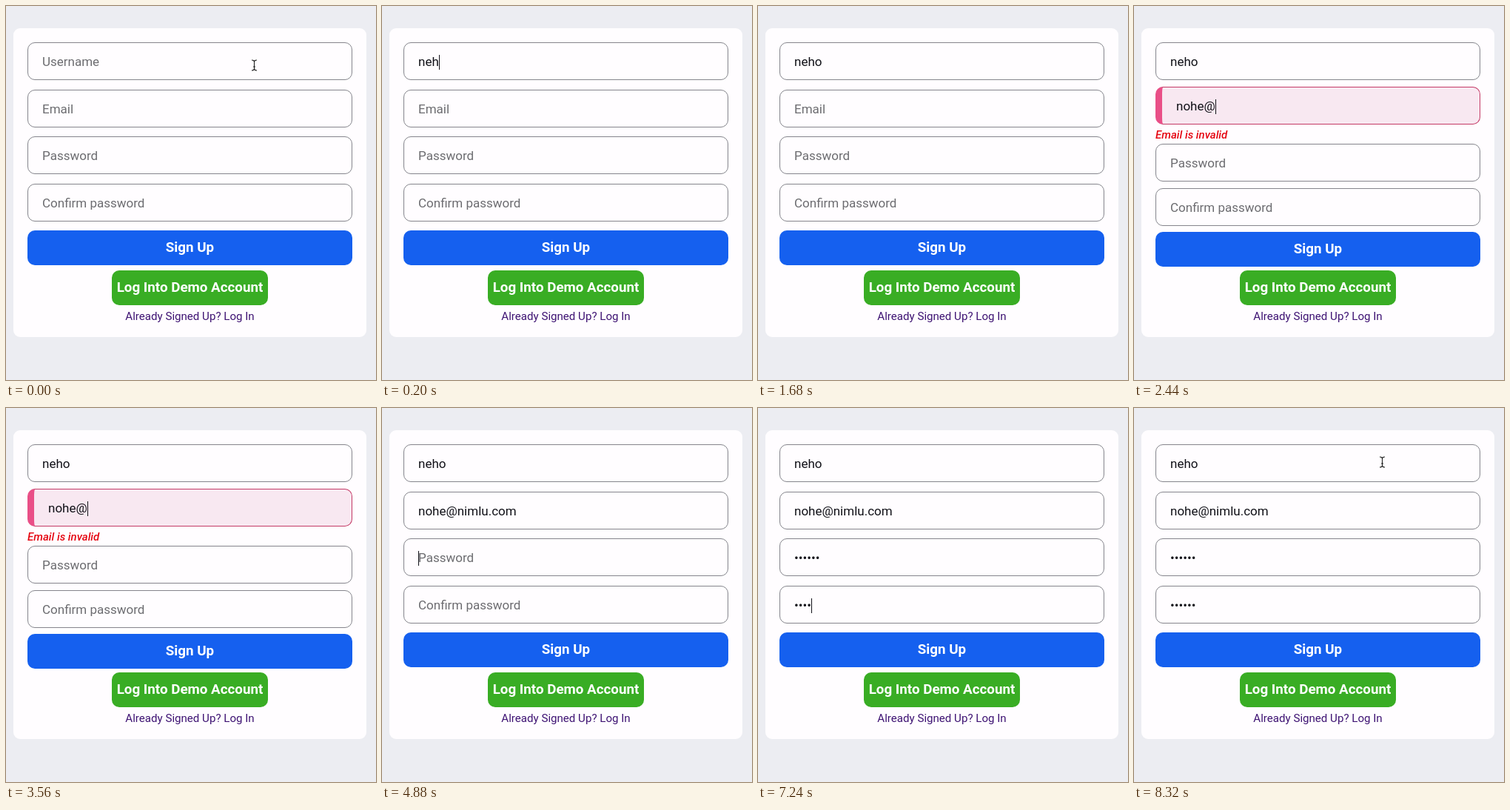
Write an HTML page that moves like this. It is 500 px wide and 505 px high and loops after 8360 ms.

```html
<!DOCTYPE html>
<html lang="en">
<head>
<meta charset="utf-8">
<title>Sign up form</title>
<style>
html, body { margin: 0; width: 100%; height: 100%; overflow: hidden; background: #ecedf2; }
body { position: relative; font-family: Roboto, Arial, sans-serif; }
body * { box-sizing: border-box; }
.card, .field, .button, .error, .link, .mouse { position: absolute; white-space: nowrap; }
.card { left: 10px; top: 30px; width: 477px; height: 417px; border-radius: 9px; background: #fffdff; }
.field {
  left: 29px; width: 439px; height: 51px; padding-left: 19px;
  border: 1px solid #85858c; border-radius: 10px;
  font-size: 17px; line-height: 50px; color: #111118;
}
.field.empty { color: #6c6c70; }
.field.invalid { border-color: #c43a66; border-left: 9px solid #e94f87; background: #f8e8f1; }
.caret { display: inline-block; position: relative; width: 0; height: 20px; vertical-align: middle; }
.caret::after { content: ""; position: absolute; left: 0; top: -1px; width: 1px; height: 20px; background: #111118; }
.error {
  left: 29px; width: 439px; white-space: normal;
  font: italic 500 15px/18px Roboto, Arial, sans-serif; color: #e50510;
}
.button {
  height: 47px; border-radius: 10px; text-align: center;
  font-size: 18.8px; font-weight: 700; line-height: 47px; color: #fff;
}
.signup { left: 29px; width: 439px; background: #1560ef; }
.demo { left: 143px; width: 211px; background: #39ad24; }
.link { left: 10px; width: 477px; top: 409px; text-align: center; font-size: 15.1px; line-height: 20px; color: #3e1373; }
.mouse { left: 331px; width: 9px; height: 16px; }
</style>
</head>
<body>
<div class="card"></div>
<div class="field"></div>
<div class="field"></div>
<div class="field"></div>
<div class="field"></div>
<div class="error"></div>
<div class="button signup">Sign Up</div>
<div class="button demo">Log Into Demo Account</div>
<div class="link">Already Signed Up? Log In</div>
<svg class="mouse" viewBox="0 0 9 16" fill="none" stroke="#222" stroke-width="1.1">
  <path d="M1 1Q4 1 4.5 3Q5 1 8 1M4.5 3V13M1 15Q4 15 4.5 13Q5 15 8 15M3 10H6"/>
</svg>
<script>
const LOOP = 8360, STEP = 40;
const find = s => document.querySelector(s);
const fields = [...document.querySelectorAll(".field")];
const error = find(".error"), signup = find(".signup"), demo = find(".demo"), mouse = find(".mouse");
const hints = ["Username", "Email", "Password", "Confirm password"];

// Key bursts: field, characters, first key time, key interval
const bursts = [
  [0, "neh", 80, 40], [0, "o", 1000, 0],
  [1, "nohe@", 1840, 80], [1, "nimlu.com", 3640, 70],
  [2, "••••", 5120, 80], [2, "••", 6560, 60],
  [3, "••••", 6960, 70], [3, "••", 7640, 60]
];
const focusTimes = [40, 1760, 4720, 6840];

// Validation messages: field, start, end, text
const errors = [
  [0, 700, 1400, "Username must have at least 4 characters"],
  [1, 2440, 4600, "Email is invalid"],
  [2, 5720, 6700, "Password must have at least 6 characters, 1 uppercase, 1 lowercase letter and 1 number"],
  [3, 7440, 8000, "Passwords must match"]
];

// Row spacing, message height, message gap and button spacing by message line count
const layouts = [[63.5, 0, 0, 54], [59.6, 18, 5, 51.5], [56.3, 36, 2, 49.6]];

const setTop = (el, y) => { el.style.top = Math.round(y) + "px"; };

function typedAt(t) {
  const texts = ["", "", "", ""];
  const focus = focusTimes.filter(f => f <= t).length - 1;
  let last = focusTimes[focus] || 0;
  for (const [field, chars, start, gap] of bursts) {
    [...chars].forEach((char, i) => {
      const time = start + i * gap;
      if (time > t) return;
      texts[field] += char;
      last = Math.max(last, time);
    });
  }
  return { texts, focus, caretOn: (t - last) % 1000 < 500 };
}

function render(t) {
  const { texts, focus, caretOn } = typedAt(t);
  const active = errors.find(e => t >= e[1] && t < e[2]);
  const lines = !active ? 0 : active[0] === 2 ? 2 : 1;
  const [step, height, gap, buttonStep] = layouts[lines];
  const bad = active ? active[0] : -1;
  let y = 49;

  fields.forEach((field, i) => {
    const text = texts[i];
    field.className = "field" + (text ? "" : " empty") + (i === bad ? " invalid" : "");
    field.textContent = text || hints[i];
    if (i === focus && caretOn) {
      const caret = document.createElement("span");
      caret.className = "caret";
      text ? field.append(caret) : field.prepend(caret);
    }
    setTop(field, y);
    if (i === bad) {
      setTop(error, y + 51 + gap);
      y += height;
    }
    y += step;
  });

  error.textContent = active ? active[3] : "";
  setTop(signup, y);
  setTop(demo, y + buttonStep);
  mouse.style.display = t < 80 || t >= 8200 ? "block" : "none";
  setTop(mouse, t < 80 ? 72 : 65);
}

const begin = performance.now();
function tick() {
  const t = (performance.now() - begin) % LOOP;
  render(Math.floor(t / STEP) * STEP);
  requestAnimationFrame(tick);
}
tick();
</script>
</body>
</html>
```
